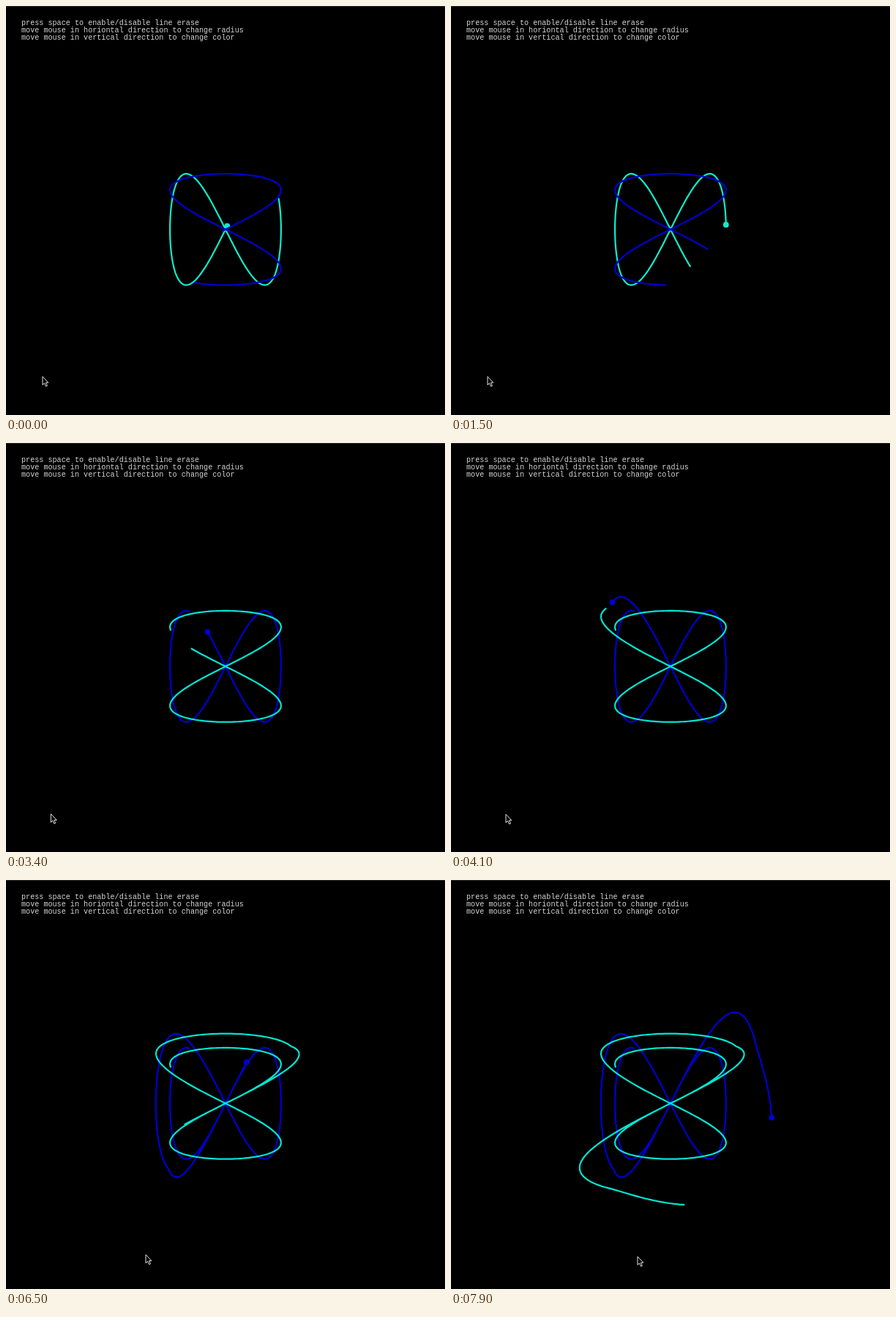
These frames come from a looping animation (600x558 px, 8 s). An HTML page:

```html
<!DOCTYPE html>
<html lang="en">
<head>
<meta charset="utf-8">
<title>Line curves</title>
<style>
  html, body { margin: 0; width: 100%; height: 100%; overflow: hidden; background: #000; }
  svg { display: block; width: 600px; height: 558px; }
  text { font: 10.13px "Liberation Mono", monospace; fill: #d4d4d4; white-space: pre; }
  polyline { fill: none; stroke-width: 2.2; stroke-linejoin: round; }
</style>
</head>
<body>
<svg viewBox="0 0 600 558">
  <rect width="600" height="558"/>
  <rect width="600" height="1" fill="#2a2a2a"/>
  <text x="21" y="25.8">press space to enable/disable line erase</text>
  <text x="21" y="36">move mouse in horiontal direction to change radius</text>
  <text x="21" y="46.2">move mouse in vertical direction to change color</text>
  <polyline id="upright"/>
  <circle id="dot" r="3.9"/>
  <polyline id="sideways"/>
  <path id="cursor" d="M.5 .5V12L3.1 9.6L5 13.9L6.9 13.1L5 8.9H8.4Z" fill="#000" stroke="#e4e4e4"/>
</svg>
<script>
const LOOP = 8000, STEP = 100;
const CENTER = { x: 300, y: 304.8 };
const PHASE = 0.03, SPEED = 0.9992;
const TRAIL = 5.04, ERASE_STOP = 2.57, SWAP_TIME = 3;
const BLUE = "#0000d0";

const $ = id => document.getElementById(id);
const upright = $("upright"), sideways = $("sideways"), dot = $("dot"), cursor = $("cursor");

const progress = (t, from, to) => Math.min(1, Math.max(0, (t - from) / (to - from)));
const easeOut = p => Math.sin(p * Math.PI / 2);
const easeInOut = p => p * p * (3 - 2 * p);

const angleAt = t => PHASE + SPEED * t;

// The radius grows in three pulls of the mouse
const radius = t => 75.9
  + 19.3 * easeOut(progress(t, 3, 4))
  + 29 * easeOut(progress(t, 5.3, 7))
  + 15.8 * easeInOut(progress(t, 7.45, 8));

const mouseX = t => 49.5
  + 25 * progress(t, 2.9, 4)
  + 116 * progress(t, 5.3, 6.5)
  + 64 * easeInOut(progress(t, 6.5, 7.9));

function offset(angle) {
  const r = radius((angle - PHASE) / SPEED);
  return [r * Math.sin(angle), -r * Math.sin(2 * angle)];
}

const place = (dx, dy) => `${(CENTER.x + dx).toFixed(2)},${(CENTER.y + dy).toFixed(2)}`;

function draw(ms) {
  const t = Math.floor(ms / STEP) * STEP / 1000;
  const head = angleAt(t);
  const tail = angleAt(Math.min(t, ERASE_STOP)) - TRAIL;
  const count = Math.ceil((head - tail) / 0.025);
  const a = [], b = [];
  for (let i = 0; i <= count; i++) {
    const [u, v] = offset(tail + (head - tail) * i / count);
    a.push(place(u, v));
    b.push(place(v, u));
  }
  upright.setAttribute("points", a.join(" "));
  sideways.setAttribute("points", b.join(" "));

  const swapped = t >= SWAP_TIME;
  const main = swapped ? BLUE : "#10eccb";
  upright.setAttribute("stroke", main);
  sideways.setAttribute("stroke", swapped ? "#04e5d3" : BLUE);

  const [dx, dy] = offset(head);
  dot.setAttribute("cx", CENTER.x + dx);
  dot.setAttribute("cy", CENTER.y + dy);
  dot.setAttribute("fill", main);

  const x = mouseX(t);
  cursor.setAttribute("transform", `translate(${x} ${505 + 0.04 * (x - 49.5)})`);
}

const start = performance.now();
function tick() {
  draw((performance.now() - start) % LOOP);
  requestAnimationFrame(tick);
}
tick();
</script>
</body>
</html>
```
